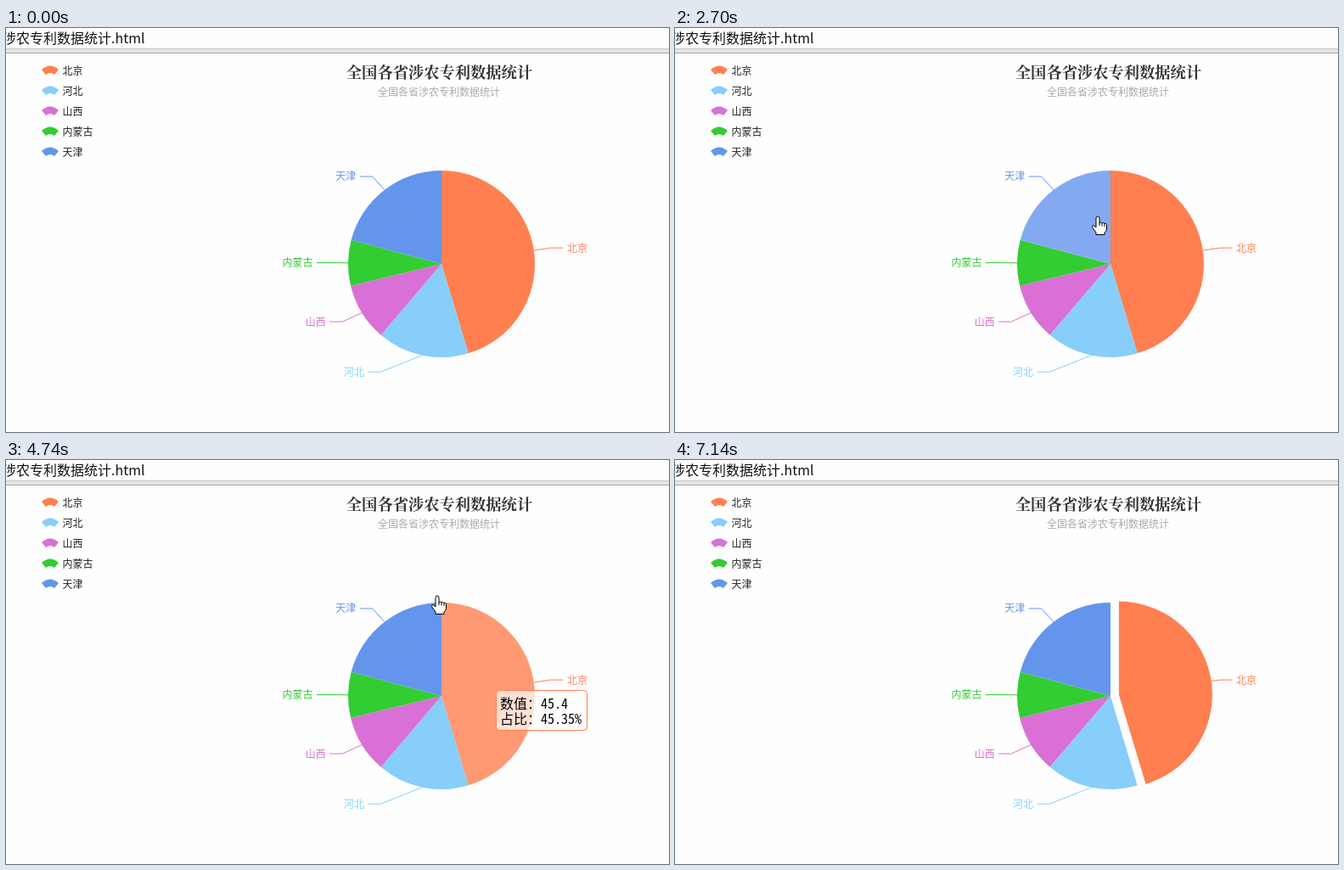
Recreate the animation shown at these times as an HTML page with a canvas. Size 781 by 476 pixels, loop 7560 ms.

```html
<!DOCTYPE html>
<html lang="zh-CN">
<head>
<meta charset="utf-8">
<style>
html, body { margin: 0; width: 100%; height: 100%; overflow: hidden; background: #fefefe; }
canvas { display: block; }
</style>
</head>
<body>
<canvas id="stage" width="781" height="476"></canvas>
<script>
const g = document.getElementById('stage').getContext('2d');
const LOOP = 7560, STEP = 60, CX = 513, CY = 278, R = 110, TURN = 2 * Math.PI;
const HIDE = 1020, SHOW = 2100, OPEN = 5880, CLOSE = 6720, LEAVE = 6960;
const SANS = '"Noto Sans CJK SC", "Noto Sans CJK", sans-serif';
const SERIF = '"Noto Serif CJK SC", "Noto Sans CJK SC", "Noto Sans CJK", serif';
const MONO = '"Noto Sans Mono CJK SC", "Noto Sans CJK SC", "Noto Sans CJK", monospace';
const data = [
  { name: '北京', value: 45.4, rgb: [255, 127, 80] },
  { name: '河北', value: 15.9, rgb: [135, 206, 250] },
  { name: '山西', value: 10, rgb: [218, 112, 214] },
  { name: '内蒙古', value: 7.9, rgb: [50, 205, 50] },
  { name: '天津', value: 20.9, rgb: [100, 149, 237] }
];
const total = data.reduce((s, d) => s + d.value, 0);

// Pointer moves: [start, end, x, y], each easing out to its point
const moves = [
  [60, 480, 72, 46], [2400, 2700, 498, 222], [2940, 3300, 440, 280],
  [3540, 3660, 445, 322], [3900, 3960, 471, 336], [4380, 4440, 557, 291],
  [4680, 4740, 508, 160], [4740, 4860, 492, 96], [5160, 5280, 604, 114],
  [5280, 5460, 561, 240], [OPEN, 6300, 640, 160], [CLOSE, LEAVE, 770, 35]
];

const mix = (a, b, p) => a + (b - a) * p;
const clamp = v => Math.max(0, Math.min(1, v));
const within = (t, a, b) => t >= a && t < b;
const color = (d, lift = 0) => `rgb(${d.rgb.map(c => Math.round(mix(c, 255, lift)))})`;

function pointerAt(t) {
  let x = 765, y = 29;
  for (const [a, b, tx, ty] of moves) {
    const p = 1 - (1 - clamp((t - a) / (b - a))) ** 2;
    x = mix(x, tx, p);
    y = mix(y, ty, p);
  }
  return [x, y];
}

// Start and end angles, clockwise from the top, when the first value is scaled
function angles(first) {
  const values = data.map((d, i) => i ? d.value : d.value * first);
  const sum = values.reduce((a, b) => a + b);
  let at = 0;
  return values.map(v => [at, at += v / sum * TURN]);
}

function labelPlace([a, b]) {
  const m = (a + b) / 2, s = Math.sin(m), c = -Math.cos(m), side = s < 0 ? -1 : 1;
  const spread = c > 0 ? 48 * c ** 3.2 : side < 0 ? 2 : 0;
  return {
    side,
    pts: [CX + R * s, CY + R * c, CX + 130 * s + side * spread, CY + 130 * c]
  };
}

const full = angles(1), reduced = angles(0);
const fullLabels = full.map(labelPlace), reducedLabels = reduced.map(labelPlace);

function sliceAt([x, y]) {
  if (Math.hypot(x - CX, y - CY) > R) return -1;
  const angle = (Math.atan2(x - CX, CY - y) + TURN) % TURN;
  return full.findIndex(([a, b]) => within(angle, a, b));
}

function legendAt([x, y]) {
  return x < 105 && y < 160 ? Math.round((y - 50) / 24) : -1;
}

function collapse(t) {
  const ease = since => 2 ** (-(t - since + 52) / 50);
  if (t < HIDE) return 0;
  return t < SHOW ? 1 - ease(HIDE) : ease(SHOW);
}

function text(s, x, y, fill, font, align = 'left') {
  g.font = font;
  g.fillStyle = fill;
  g.textAlign = align;
  g.fillText(s, x, y);
}

function box(x, y, w, h, r, fill, stroke) {
  g.beginPath();
  g.roundRect(x, y, w, h, r);
  g.fillStyle = fill;
  g.fill();
  if (stroke) {
    g.strokeStyle = stroke;
    g.lineWidth = 1;
    g.stroke();
  }
}

function label(i, p) {
  const a = fullLabels[i], b = reducedLabels[i], d = data[i];
  const flips = i === 0 || a.side !== b.side;
  if (flips && p > .1 && (i === 0 || p < .9)) return;
  const place = flips ? Math.round(p) : p;
  const [x0, y0, x1, y1] = a.pts.map((v, k) => mix(v, b.pts[k], place));
  const side = place < .5 ? a.side : b.side, x2 = x1 + side * 15;
  g.beginPath();
  g.moveTo(x0, y0);
  g.lineTo(x1, y1);
  g.lineTo(x2, y1);
  g.strokeStyle = color(d);
  g.lineWidth = 1;
  g.stroke();
  text(d.name, x2 + side * 4.5, y1 + 4.5, color(d), '12px ' + SANS, side < 0 ? 'right' : 'left');
}

function slice([a, b], fill, x = CX, y = CY) {
  g.beginPath();
  g.moveTo(x, y);
  g.arc(x, y, R, a - TURN / 4, b - TURN / 4);
  g.fillStyle = fill;
  g.fill();
}

function pie(t, hover) {
  const p = collapse(t);
  data.forEach((d, i) => label(i, p));
  data.forEach((d, i) => {
    if (i === 0 && within(t, HIDE, SHOW)) return;
    const arc = full[i].map((v, k) => mix(v, reduced[i][k], p));
    const fill = color(d, i === hover ? .2 : 0);
    if (i === 0 && t >= OPEN) {
      const m = (arc[0] + arc[1]) / 2;
      if (t < CLOSE) slice(arc, color(d));
      slice(arc, fill, CX + 10 * Math.sin(m), CY - 10 * Math.cos(m));
    } else slice(arc, fill);
  });
}

function page(hotRow) {
  g.fillStyle = '#fefefe';
  g.fillRect(0, 0, 781, 476);
  text('涉农专利数据统计.html', -4, 18, '#111', '16px ' + SANS);
  g.fillStyle = '#e4e4e4';
  g.fillRect(0, 24, 781, 5);
  g.fillStyle = '#c8c8c8';
  g.fillRect(0, 24, 781, 1);
  g.fillStyle = '#a8a8a8';
  g.fillRect(0, 29, 781, 1);
  text('全国各省涉农专利数据统计', 510.5, 59, '#333', 'bold 18.3px ' + SERIF, 'center');
  text('全国各省涉农专利数据统计', 510, 80, '#aaa', '12px ' + SANS, 'center');
  data.forEach((d, i) => {
    const y = 50 + 24 * i;
    g.beginPath();
    g.moveTo(42, y - 1);
    g.quadraticCurveTo(52, y - 10, 62, y - 1);
    g.lineTo(57, y + 5);
    g.quadraticCurveTo(52, y + 1, 47, y + 5);
    g.fillStyle = color(d);
    g.fill();
    text(d.name, 66.5, y + 4.5, i === hotRow ? color(d) : '#222', '12px ' + SANS);
  });
}

// Trails the pointer: sits at the mean of its recent places
function tooltip(trail) {
  if (trail.some(p => sliceAt(p) < 0)) return;
  const mean = k => Math.round(trail.reduce((s, p) => s + p[k], 0) / trail.length);
  const x = mean(0) + 20, y = mean(1) - 20, d = data[sliceAt(trail[0])];
  const share = (d.value / total * 100).toFixed(2) + '%';
  box(x + .5, y + .5, 59 + 8 * share.length, 47, 4, 'rgba(255,255,255,.7)', color(d));
  text('数值：' + d.value, x + 5, y + 22, '#000', '16px ' + MONO);
  text('占比：' + share, x + 5, y + 40, '#000', '16px ' + MONO);
}

function dialog(t) {
  const alpha = t < CLOSE ? clamp(.12 + (t - OPEN) / 200) : clamp((CLOSE + 120 - t) / 180);
  if (t < OPEN || !alpha) return;
  g.save();
  g.globalAlpha = alpha;
  g.save();
  g.beginPath();
  g.rect(0, 0, 781, 476);
  g.rect(340, 30, 346, 170);
  g.clip('evenodd');
  g.shadowColor = 'rgba(0,0,0,.35)';
  g.shadowBlur = 8;
  box(340, 30, 346, 170, 2, '#fff');
  g.restore();
  box(340, 30, 346, 170, 2, '#fff');
  text('JavaScript 提醒', 360, 58, '#333', 'bold 15px ' + SANS);
  text('×', 671, 51, '#777', 'bold 16px ' + SANS, 'center');
  text('当前选择：【系列0】专利数量，【数据0】北京', 360, 98, '#333', '12px ' + SANS);
  box(360.5, 112.5, 14, 14, 2, '#f4f4f4', '#aaa');
  text('禁止此页再显示对话框。', 380, 123.5, '#333', '12px ' + SANS);
  box(595.5, 151.5, 69, 28, 2, '#eee', '#b0b0b0');
  text('确定', 630, 170, '#333', '12px ' + SANS, 'center');
  g.restore();
}

const arrow = new Path2D('M.5 .5V16.5L4.2 13L6.8 18.6L9.2 17.6L6.8 12H11.8Z');
const hand = new Path2D('M0 0Q2 0 2 2V8Q3 6 5 8Q6 6.5 8 8.5Q10.5 7.5 10.5 11V15' +
  'Q10 18 8 19V21.5H-2V19L-6 13.5Q-7.5 10.5-5 10.5L-2 13V2Q-2 0 0 0ZM2 8V11M5 8V11.5M8 8.5V12');

function cursor(t, shape) {
  if (!within(t, 60, LEAVE)) return;
  g.save();
  g.translate(...pointerAt(t).map(Math.round));
  g.fillStyle = '#fff';
  g.fill(shape);
  g.strokeStyle = '#000';
  g.lineWidth = 1;
  g.stroke(shape);
  g.restore();
}

function draw(t) {
  const blocked = within(t, OPEN, CLOSE);
  const live = blocked ? OPEN : t; // an open dialog freezes the page
  const trail = [1, 2, 3, 4, 5].map(k => pointerAt(live - k * STEP));
  const row = legendAt(trail[0]);
  const hover = Math.max(row, sliceAt(trail[0]));
  page(row);
  pie(t, hover);
  tooltip(trail);
  dialog(t);
  cursor(t, hover >= 0 && !blocked ? hand : arrow);
}

let start;
function frame(now) {
  start ??= now;
  const t = (now - start) % LOOP;
  draw(Math.floor(t / STEP) * STEP);
  requestAnimationFrame(frame);
}
draw(0);
requestAnimationFrame(frame);
</script>
</body>
</html>
```
